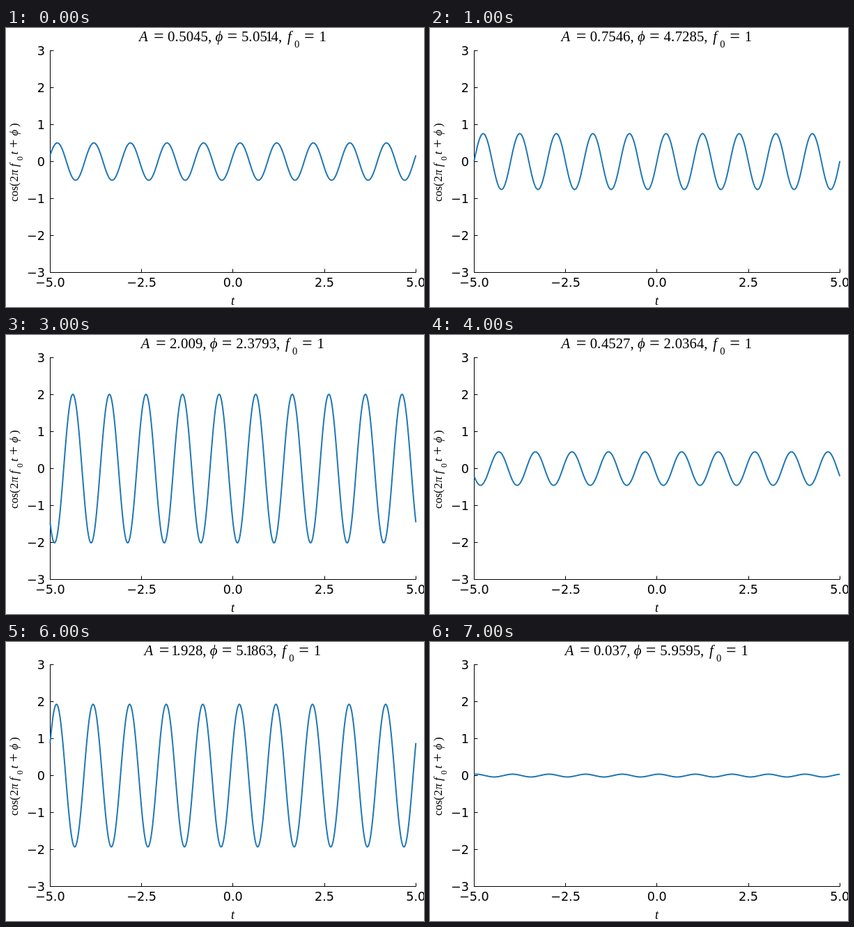
An HTML page with a canvas for the animation above (8 s loop, 600 by 400 pixels).

```html
<!DOCTYPE html>
<html>
<head>
<meta charset="utf-8">
<style>
html, body { margin: 0; overflow: hidden; background: #fff; }
canvas { display: block; }
</style>
</head>
<body>
<canvas id="plot" width="600" height="400"></canvas>
<script>
const ctx = document.getElementById('plot').getContext('2d');
const HOLD = 1000;
const SERIF = '"Liberation Serif", "Noto Serif", serif';
const SANS = '"DejaVu Sans", sans-serif';

// [amplitude, phase], one pair per second
const waves = [
  [0.5045, 5.0514], [0.7546, 4.7285], [0.4391, 4.3925], [2.009, 2.3793],
  [0.4527, 2.0364], [0.6812, 1.5908], [1.928, 5.1863], [0.037, 5.9595]
];

const px = t => 63.3 + (t + 5) * 52.5;
const py = v => 191.5 - v * 53;

function text(str, x, y, size, style = '', family = SERIF, align = 'left') {
  ctx.font = `${style} ${size}px ${family}`;
  ctx.textAlign = align;
  ctx.fillText(str, x, y);
}

// Draws a number with tight spacing around an inner 1 and returns its end.
function number(value, x, y) {
  const chars = [...String(value)];
  chars.forEach((c, i) => {
    const tight = c === '1' && i < chars.length - 1 ? 2.4 : 0;
    text(c, x - tight, y, 20.8);
    x += (c === '.' ? 5.8 : 10.4) - 2 * tight;
  });
  return x;
}

function numberWidth(value) {
  const s = String(value);
  return (s.length - 1) * 10.4 + 5.8 - (s.slice(0, -1).split('1').length - 1) * 4.8;
}

function title(amp, phase) {
  const y = 18.7;
  const equals = x => text('=', x, y + 1, 26);
  let x = 325 - (159 + numberWidth(amp) + numberWidth(phase)) / 2;
  text('A', x + 0.8, y, 20.8, 'italic');
  equals(x + 22);
  x = number(amp, x + 42, y);
  text(',', x, y, 20.8);
  text('ϕ', x + 10.5, y, 20.8, 'italic');
  equals(x + 27.5);
  x = number(phase, x + 48, y);
  text(',', x, y, 20.8);
  text('f', x + 13, y, 20.8, 'italic');
  text('0', x + 23, 28, 14.6);
  equals(x + 37);
  text('1', x + 58.5, y, 20.8);
}

function axes() {
  ctx.strokeStyle = '#000';
  ctx.lineWidth = 1;
  ctx.beginPath();
  ctx.moveTo(63.5, 32);
  ctx.lineTo(63.5, 350.5);
  ctx.lineTo(588.5, 350.5);
  for (let v = -3; v <= 3; v++) {
    ctx.moveTo(63.5, py(v));
    ctx.lineTo(68.5, py(v));
    text(String(v).replace('-', '−'), 56, py(v) + 6.5, 17.6, '', SANS, 'right');
  }
  for (let t = -5; t <= 5; t += 2.5) {
    const x = Math.floor(px(t)) + 0.5;
    ctx.moveTo(x, 350.5);
    ctx.lineTo(x, 345.5);
    text(t.toFixed(1).replace('-', '−'), px(t), 371, 17.6, '', SANS, 'center');
  }
  ctx.stroke();
}

function labels() {
  text('t', 325.5, 397, 18, 'italic', SERIF, 'center');
  ctx.save();
  ctx.translate(17, 249);
  ctx.rotate(-Math.PI / 2);
  text('cos', 0, 0, 16.8);
  text('(', 22, 0, 16.8);
  text('2', 28.5, 0, 16.8);
  text('π', 37.5, 0, 16.8, 'italic');
  text('f', 50, 0, 16.8, 'italic');
  text('0', 59, 7, 11.8);
  text('t', 67.5, 0, 16.8, 'italic');
  text('+', 77, 1, 22);
  text('ϕ', 94.5, 0, 16.8, 'italic');
  text(')', 107, 0, 16.8);
  ctx.restore();
}

function curve(amp, phase) {
  ctx.strokeStyle = '#1f77b4';
  ctx.lineWidth = 2;
  ctx.lineJoin = 'round';
  ctx.beginPath();
  for (let i = 0; i <= 1000; i++) {
    const t = i / 100 - 5;
    ctx.lineTo(px(t), py(amp * Math.cos(2 * Math.PI * t + phase)));
  }
  ctx.stroke();
}

function draw() {
  const [amp, phase] = waves[Math.floor(performance.now() / HOLD) % waves.length];
  ctx.fillStyle = '#fff';
  ctx.fillRect(0, 0, 600, 400);
  ctx.fillStyle = '#000';
  axes();
  labels();
  title(amp, phase);
  curve(amp, phase);
  requestAnimationFrame(draw);
}
draw();
</script>
</body>
</html>
```
